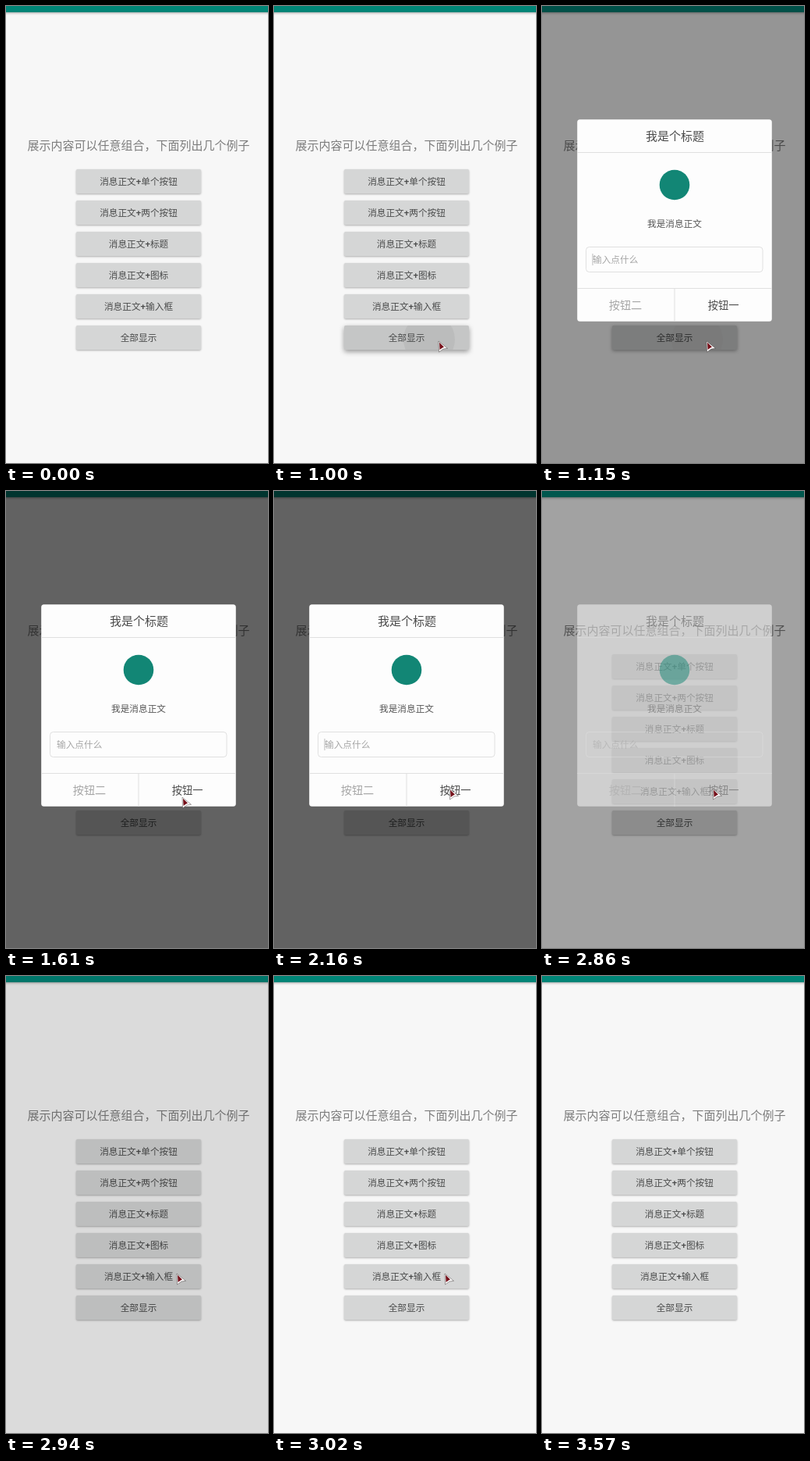
Write an HTML page with a canvas that moves like this. It is 336 by 585 pixels and loops after 4260 ms.

```html
<!DOCTYPE html>
<html lang="zh-CN">
<head>
<meta charset="utf-8">
<title>对话框演示</title>
<style>
  html, body { margin: 0; width: 100%; height: 100%; overflow: hidden; background: #f7f7f7; }
  canvas { display: block; }
</style>
</head>
<body>
<canvas id="stage" width="336" height="585"></canvas>
<script>
const ctx = document.getElementById('stage').getContext('2d');
const W = 336, H = 585, CX = 170;
const LOOP = 4260, TICK = 77.3, LEAD = 14;
const SMALL = 11.67;
const CJK = '"Noto Sans CJK SC", "Noto Sans CJK", sans-serif';
const LABELS = ['消息正文+单个按钮', '消息正文+两个按钮', '消息正文+标题',
  '消息正文+图标', '消息正文+输入框', '全部显示'];

// Pointer legs in ticks
const ENTRY = { x: 257, y: 566 };
const LEGS = [
  { from: 2, to: 7, x: 211, y: 429 },
  { from: 17, to: 21, x: 226, y: 392 },
  { from: 23, to: 28, x: 225, y: 381 },
  { from: 31, to: 33, x: 219, y: 381 },
  { from: 42, to: 45, x: 321, y: 570 }
];

const ramp = (n, a, b) => Math.min(1, Math.max(0, (n - a) / (b - a)));
const smooth = p => p * p * (3 - 2 * p);
const mix = (a, b, p) => a + (b - a) * p;
const black = a => `rgba(0,0,0,${a})`;

function box(x, y, w, h, r) {
  ctx.beginPath();
  ctx.roundRect(x, y, w, h, r);
}

function rect(x, y, w, h, color) {
  ctx.fillStyle = color;
  ctx.fillRect(x, y, w, h);
}

function shadow(alpha, blur, dy) {
  ctx.shadowColor = black(alpha);
  ctx.shadowBlur = blur;
  ctx.shadowOffsetY = dy;
}

function text(str, x, midY, size, color, align = 'center') {
  ctx.font = `${size}px ${CJK}`;
  ctx.fillStyle = color;
  ctx.textAlign = align;
  ctx.fillText(str, x, midY + size * .38);
}

// A label whose plus sign is set in a heavier Latin face
function label(str, midY) {
  const runs = str.split(/(\+)/).map(s => {
    const font = s === '+' ? `500 ${SMALL}px Roboto, sans-serif` : `${SMALL}px ${CJK}`;
    ctx.font = font;
    return { s, font, w: ctx.measureText(s).width };
  });
  let x = CX - runs.reduce((sum, r) => sum + r.w, 0) / 2;
  ctx.fillStyle = '#4a4b4b';
  ctx.textAlign = 'left';
  for (const r of runs) {
    ctx.font = r.font;
    ctx.fillText(r.s, x, midY + SMALL * .38);
    x += r.w;
  }
}

function button(str, y, grow, press) {
  ctx.save();
  shadow(.3 + .1 * press, 2.5 + 4 * press, 1 + 1.5 * press);
  box(90, y, 160, 31, 1.7);
  ctx.fillStyle = '#d5d6d6';
  ctx.fill();
  ctx.restore();
  if (press) {
    ctx.save();
    box(90, y, 160, 31, 1.7);
    ctx.clip();
    rect(90, y, 160, 31, black(.075 * press));
    ctx.beginPath();
    ctx.arc(mix(211, 199, grow), mix(430, 427, grow), mix(4, 33, grow), 0, Math.PI * 2);
    ctx.fillStyle = black(.05 * press);
    ctx.fill();
    ctx.restore();
  }
  label(str, y + 15.7);
}

function page(n) {
  rect(0, 0, W, H, '#f7f7f7');
  ctx.save();
  shadow(.35, 3, 1);
  rect(-5, -5, W + 10, 13, '#008577');
  ctx.restore();
  text('展示内容可以任意组合，下面列出几个例子', CX, 178, 15, '#7c7c7c');
  const grow = ramp(n, 10.6, 13);
  const press = grow * (1 - ramp(n, 13.5, 16));
  LABELS.forEach((s, i) => button(s, 209 + 40 * i, grow, i === 5 ? press : 0));
}

function dialog(n) {
  const open = ramp(n, 13, 15);
  const alpha = open - ramp(n, 36, 38);
  if (alpha <= 0) return;
  const scale = mix(.93, 1, open);
  ctx.save();
  ctx.globalAlpha = alpha;
  ctx.translate(CX, 274.5);
  ctx.scale(scale, scale);
  ctx.translate(-CX, -274.5);

  box(45.2, 145.2, 249.6, 258.6, 3.5);
  ctx.fillStyle = '#fdfdfd';
  ctx.fill();
  text('我是个标题', CX + .5, 166.3, 15, '#4a4a4a');
  rect(45, 187, 250, 1, '#e0e0e0');

  ctx.beginPath();
  ctx.arc(CX, 229, 19.3, 0, Math.PI * 2);
  ctx.fillStyle = '#128675';
  ctx.fill();
  text('我是消息正文', CX, 279, SMALL, '#565656');

  box(56.5, 308.5, 226.5, 32, 4);
  ctx.lineWidth = 1;
  ctx.strokeStyle = '#e0e0e0';
  ctx.stroke();
  text('输入点什么', 65, 324.7, SMALL, '#a6a6a6', 'left');
  const caretOn = Math.floor((n - 14) / 6.3) % 2 === 0;
  if (caretOn) rect(64.5, 317, 1, 15, '#bbb');

  rect(45, 361, 250, 1, '#e0e0e0');
  rect(169.5, 362, 1, 42, '#e0e0e0');
  text('按钮二', 107, 383, 14.17, '#a6a6a6');
  text('按钮一', 232.7, 383, 13.33, '#4a4a4a');
  ctx.restore();
}

function poly(points, fill) {
  ctx.beginPath();
  points.forEach(([x, y]) => ctx.lineTo(x, y));
  ctx.closePath();
  ctx.fillStyle = fill;
  ctx.fill();
}

function pointer(n) {
  if (n < 2 || n > 45) return;
  let { x, y } = ENTRY;
  for (const leg of LEGS) {
    const p = smooth(ramp(n, leg.from, leg.to));
    x = mix(x, leg.x, p);
    y = mix(y, leg.y, p);
  }
  ctx.save();
  ctx.translate(x, y);
  poly([[0, 0], [11.5, 9.3], [6, 10], [.6, 14]], '#fff');
  ctx.lineWidth = .7;
  ctx.strokeStyle = 'rgba(50,40,40,.6)';
  ctx.stroke();
  poly([[1, 1.8], [7, 7.6], [4.6, 8.8], [1.6, 11]], '#75101a');
  ctx.restore();
}

function draw(ms) {
  const n = Math.floor((ms % LOOP + LEAD) / TICK);
  page(n);
  rect(0, 0, W, H, black(.6 * (ramp(n, 13, 16) - ramp(n, 35.9, 38.5))));
  dialog(n);
  pointer(n);
}

const start = performance.now();
function tick() {
  draw(performance.now() - start);
  requestAnimationFrame(tick);
}
tick();
</script>
</body>
</html>
```
